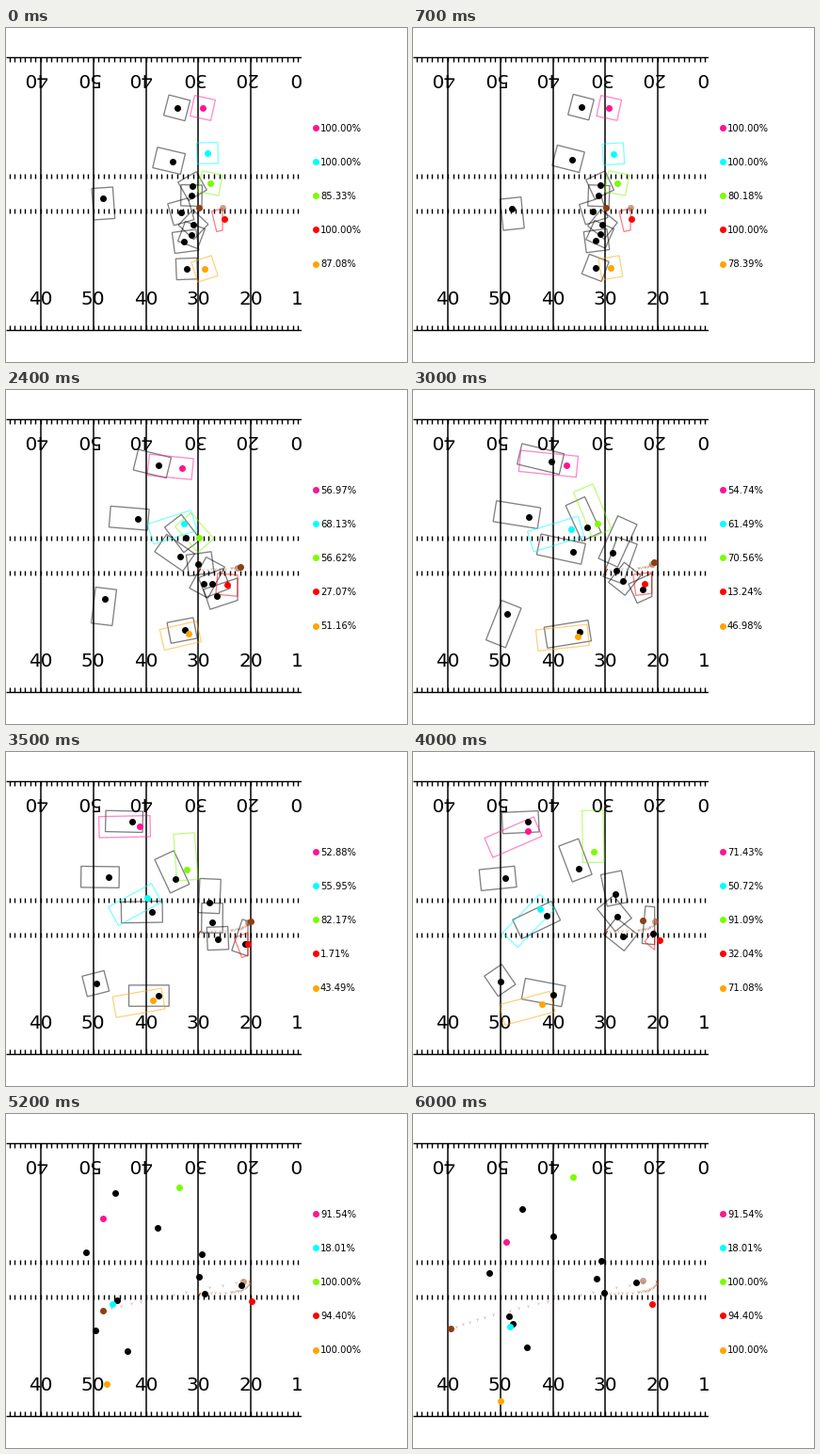
A matplotlib script for the animation above (6100 ms loop, 426 by 355 pixels).

```python
import numpy as np
import matplotlib.pyplot as plt
from matplotlib.animation import FuncAnimation
from matplotlib.patches import Polygon

W, H, DPI = 426, 355, 71
PX = 72 / DPI
FRAMES, STEP = 61, 100
FIELD_W = 314
KEYS = np.array([0, 15, 24, 35, 45, 60])
PCT_KEYS = [0, 7, 15, 24, 35, 45, 48]
SNAP, CATCH, THROW = 11, 18, 39
BOX_END = 49          # boxes vanish shortly after the throw
HALF = 11.2           # half width of a box and its reach behind the player
BROWN, TAN = "#8b3f13", "#a0522d"
PINK, CYAN, GREEN, RED, ORANGE = "#ff1493", "#00ffff", "#7cfc00", "#ff0000", "#ffa500"
TIME = np.arange(FRAMES)

plt.rcParams["font.family"] = "DejaVu Sans"
fig = plt.figure(figsize=(W / DPI, H / DPI), dpi=DPI, facecolor="white")
ax = fig.add_axes([0, 0, FIELD_W / W, 1])
ax.set(xlim=(0, FIELD_W), ylim=(H, 0))
ax.axis("off")


def smooth(*points):
    """Positions in every frame on a monotone cubic through the key points."""
    p = np.array(points, float)
    span = np.diff(KEYS)[:, None]
    rate = np.diff(p, axis=0) / span
    a, b = rate[:-1], rate[1:]
    same = a * b > 0
    inner = np.where(same, 2 * a * b / np.where(same, a + b, 1), 0)
    slope = np.vstack([rate[:1], inner, rate[-1:]])
    i = np.clip(np.searchsorted(KEYS, TIME, side="right") - 1, 0, len(span) - 1)
    s = span[i]
    u = (TIME[:, None] - KEYS[i][:, None]) / s
    return ((1 + 2 * u) * (1 - u) ** 2 * p[i] + u * (1 - u) ** 2 * s * slope[i]
            + u * u * (3 - 2 * u) * p[i + 1] + u * u * (u - 1) * s * slope[i + 1])


def unit(degrees):
    a = np.radians(degrees)
    return np.array([np.cos(a), np.sin(a)])


def clip_right(corners, limit):
    """Cut a polygon along the vertical line x = limit."""
    kept = []
    for p, q in zip(corners, np.roll(corners, -1, axis=0)):
        if p[0] <= limit:
            kept.append(p)
        if (p[0] <= limit) != (q[0] <= limit):
            kept.append(p + (q - p) * (limit - p[0]) / (q[0] - p[0]))
    return np.array(kept)


def dot(color, x=0, y=0, z=5, **kw):
    return ax.plot([x], [y], "o", ms=7 * PX, mew=0, color=color,
                   zorder=z, **kw)[0]


def draw_field():
    gap = 55.75
    ticks = 37 + gap / 10 * np.arange(-6, 50)
    ax.hlines([30.5, 320.5], 0, FIELD_W, color="k", lw=1.4 * PX, zorder=1)
    ax.vlines(37 + gap * np.arange(5), 31, 321, color="k", lw=1.5 * PX, zorder=1)
    for top in (31, 155, 192, 316):
        ax.vlines(ticks, top, top + 4.5, color="k", lw=1.4 * PX, zorder=1)
    style = dict(size=20 * PX, ha="center", va="center_baseline",
                 rotation_mode="anchor", clip_on=True, zorder=2)
    for k, label in enumerate(("40", "50", "40", "30", "20", "10")):
        x = 37 + gap * k
        ax.text(x, 287, label, **style)
        ax.text(x - 6, 56, label, rotation=180, **style)


class Player:
    """A dot and a box that reaches ahead along the run, further with speed."""

    def __init__(self, color, stance, *points):
        self.path = smooth(*points)
        self.velocity = np.gradient(self.path, axis=0)
        # the stance sets the heading until the player gets going
        ease = 0.6 * np.clip(1 - TIME / 24, 0, 1)
        self.heading = self.velocity + ease[:, None] * unit(stance)
        self.dot = dot(color, z=5 if color == "k" else 6)
        self.box = ax.add_patch(Polygon(
            np.zeros((4, 2)), fill=False, ec=color, alpha=0.5,
            lw=1.3 * PX, zorder=3, joinstyle="miter"))

    def outline(self, t):
        pos, (dx, dy) = self.path[t], self.heading[t]
        fwd = np.array([dx, dy]) / max(np.hypot(dx, dy), 1e-6)
        side = HALF * np.array([-fwd[1], fwd[0]])
        reach = max(HALF, 7 + 9.5 * np.hypot(*self.velocity[t]))
        front, back = pos + reach * fwd, pos - HALF * fwd
        return np.array([front + side, front - side, back - side, back + side])

    def update(self, t):
        self.dot.set_data(*self.path[t][:, None])
        # boxes only cover the ground downfield of the passer
        shape = clip_right(self.outline(t), passer_path[t, 0])
        shown = t < BOX_END and len(shape) > 2
        self.box.set_visible(shown)
        if shown:
            self.box.set_xy(shape)


def ball_flight():
    """Snap to the passer, carry, then a slowing throw downfield."""
    snap = np.array([205, 191])
    hold = passer_path + [2.5, -1.5]
    u = np.clip((TIME - SNAP) / (CATCH - SNAP), 0, 1)[:, None]
    path = snap + (hold - snap) * u
    v = (TIME[THROW:] - THROW) / (FRAMES - 1 - THROW)
    path[THROW:, 0] = 258 - 218.5 * (1.39 * v - 0.39 * v * v)
    path[THROW:, 1] = 177 + 51 * v
    return path


draw_field()

players = [
    # defenders
    Player("k", 195, (182, 85), (174, 83), (162, 80), (134, 74), (116, 75), (116, 101)),
    Player("k", 195, (177, 142), (158, 138), (140, 137), (109, 133), (90, 135), (81, 169)),
    Player("k", 96, (103, 181), (106, 205), (105, 222), (96, 246), (92, 240), (102, 215)),
    Player("k", 225, (198, 168), (199, 165), (191, 157), (180, 135), (171, 117), (149, 130)),
    Player("k", 265, (197, 178), (198, 179), (204, 185), (216, 160), (213, 146), (200, 156)),
    Player("k", 170, (186, 196), (194, 193), (185, 177), (155, 170), (130, 181), (106, 223)),
    Player("k", 75, (199, 209), (205, 208), (219, 206), (225, 199), (218, 193), (203, 190)),
    Player("k", 272, (197, 220), (201, 218), (210, 206), (219, 181), (212, 172), (195, 175)),
    Player("k", 355, (189, 227), (201, 225), (224, 219), (254, 204), (256, 185), (237, 179)),
    Player("k", 165, (192, 256), (195, 254), (190, 255), (162, 259), (138, 255), (121, 248)),
    # receivers
    Player(PINK, 195, (209, 85), (207, 85), (187, 83), (142, 79), (109, 93), (99, 136)),
    Player(CYAN, 190, (214, 133), (211, 135), (189, 142), (150, 155), (123, 182), (103, 226)),
    Player(GREEN, 193, (217, 165), (216, 165), (205, 157), (192, 125), (191, 90), (170, 67)),
    Player(RED, 345, (232, 203), (233, 203), (235, 207), (257, 204), (264, 197), (254, 202)),
    Player(ORANGE, 143, (211, 256), (208, 254), (194, 259), (156, 264), (121, 274), (93, 305)),
]

passer_path = smooth((230, 191), (233, 191), (246, 189), (257, 181), (256, 179), (244, 177))
ball_path = ball_flight()
passer = dot(TAN, z=4, alpha=0.55)
ball = dot(BROWN, z=4.5)
trail, = ax.plot([], [], "1", ms=3.5 * PX, mew=0.7 * PX, color=TAN,
                 alpha=0.4, zorder=2.5)

chances = {
    PINK: [100, 100, 100, 56.97, 52.88, 89.98, 91.54],
    CYAN: [100, 100, 100, 68.13, 55.95, 45.49, 18.01],
    GREEN: [85.33, 80.18, 78.47, 56.62, 82.17, 100, 100],
    RED: [100, 100, 99.99, 27.07, 1.71, 62.37, 94.40],
    ORANGE: [87.08, 78.39, 60.37, 51.16, 43.49, 98.67, 100],
}
labels = []
for row, color in enumerate(chances):
    y = 105.5 + 36.25 * row
    dot(color, 329, y, clip_on=False)
    labels.append(ax.text(334, y, "", size=10 * PX, va="center_baseline"))


def update(t):
    for player in players:
        player.update(t)
    for label, values in zip(labels, chances.values()):
        label.set_text(f"{np.interp(t, PCT_KEYS, values):.2f}%")
    passer.set_data(*passer_path[t][:, None])
    ball.set_data(*ball_path[t][:, None])
    trail.set_data(*ball_path[:t + 1].T)
    return []


anim = FuncAnimation(fig, update, frames=FRAMES, interval=STEP,
                     init_func=lambda: update(0), repeat=True, repeat_delay=0)
plt.show()
```
